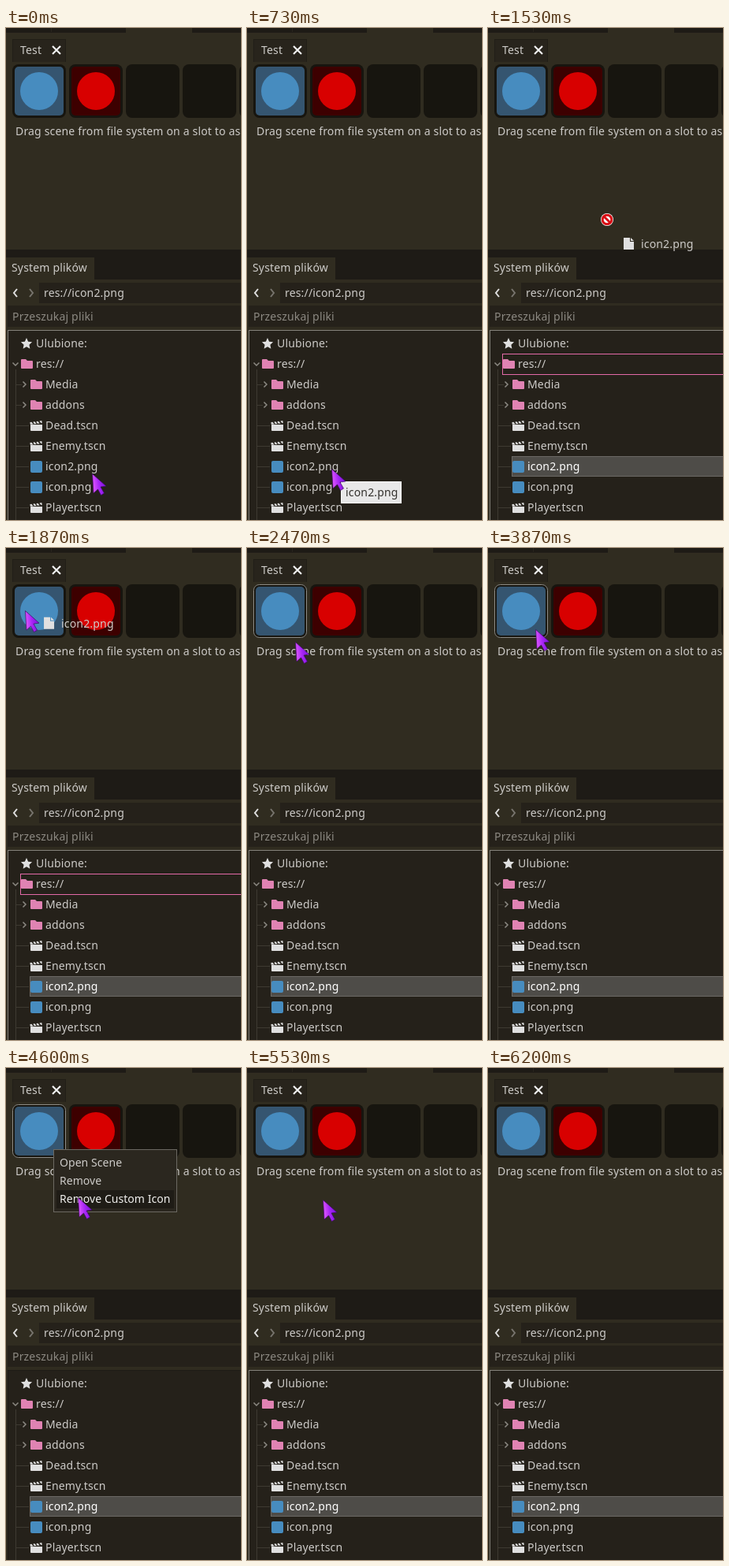
An HTML page that plays this animation: 298 by 624 pixels, repeating every 7.19 s.

```html
<!DOCTYPE html>
<html lang="pl">
<head>
<meta charset="utf-8">
<style>
html, body { margin: 0; width: 100%; height: 100%; overflow: hidden; background: #302c20; }
svg { display: block; }
text { font: 14px "Noto Sans", sans-serif; letter-spacing: .17px; fill: #cdcbc8; }
#menu text { letter-spacing: .05px; }
</style>
</head>
<body>
<svg width="298" height="624" viewBox="0 0 298 624">
  <defs>
    <linearGradient id="purple" x1="0" y1=".6" x2="1" y2=".4">
      <stop offset="0" stop-color="#e45cff"/><stop offset=".5" stop-color="#a424f4"/>
      <stop offset="1" stop-color="#7a12d8"/>
    </linearGradient>
    <path id="folder" d="M-7-5q0-1 1-1h5l2 2h6q1 0 1 1v8q0 1-1 1h-13q-1 0-1-1z" fill="#e083b3"/>
    <g id="scene" fill="#e0e0e0">
      <path d="M-7-1H8V6q0 1-1 1H-6q-1 0-1-1z"/>
      <path d="M-7-5h2l2 3h-4zM-3-5h2l2 3h-3zM1-5h2l2 3h-3zM5-5h3v3h-1z" transform="rotate(-7)"/>
    </g>
    <rect id="image" x="-7" y="-7" width="15" height="15" rx="2" fill="#478cbf"/>
  </defs>

  <!-- upper dock -->
  <rect width="298" height="624" fill="#302c20"/>
  <path d="M0 0h152v6H0zM236 0h62v6h-62z" fill="#1e1b16"/>
  <path d="M57.5 0v5" stroke="#2a261e"/>
  <rect x="8" y="14" width="68" height="29" fill="#28241c"/>
  <path d="M8 14.5h68M8.5 14v29M75.5 14v29" stroke="#211e17" fill="none"/>
  <text x="18" y="33">Test</text>
  <path d="M59 23l10 10m0-10l-10 10" stroke="#f0f0f0" stroke-width="2.2"/>
  <g id="slots"></g>
  <rect id="focus" x="8.5" y="46.5" width="67" height="67" rx="7" fill="none" stroke="#8e8b84"/>
  <text x="12" y="136">Drag scene from file system on a slot to assign</text>

  <!-- file system dock -->
  <rect y="281" width="298" height="38" fill="#1e1b16"/>
  <rect y="291" width="112" height="29" fill="#302c20"/>
  <text x="7" y="309">System plików</text>
  <path d="M14 331l-4 5 4 5" fill="none" stroke="#e0e0e0" stroke-width="2"/>
  <path d="M30 331l4 5-4 5" fill="none" stroke="#77746d" stroke-width="2"/>
  <rect x="42" y="323" width="260" height="26" fill="#25211a"/>
  <text x="48" y="341">res://icon2.png</text>
  <rect x="2" y="352" width="300" height="27" fill="#25211a"/>
  <text x="8" y="371" style="fill:#8c8982">Przeszukaj pliki</text>
  <rect id="tree" x="2.5" y="383.5" width="300" height="250" fill="#25211a"/>
  <path d="M12.5 433v191" stroke="#3e3a32"/>
  <rect id="selected" x="30.5" y="543.5" width="280" height="25" fill="#4e4c48" stroke="#6b6965"/>
  <rect id="target" x="18.5" y="413.5" width="290" height="26" fill="none" stroke="#e46aa8"/>
  <path d="M26 393l2.1 4.7 5 .6-3.7 3.4 1 5-4.4-2.5-4.4 2.5 1-5-3.7-3.4 5-.6z" fill="#e0e0e0"/>
  <path d="M8.5 424.5l3.5 3.5 3.5-3.5" fill="none" stroke="#8c8982" stroke-width="1.5"/>
  <g id="rows"></g>

  <g id="tip">
    <rect x="119.5" y="575.5" width="76" height="27" fill="#e8e8e8" stroke="#fafafa"/>
    <text x="125" y="594" style="fill:#34322e">icon2.png</text>
  </g>

  <g id="menu">
    <rect x="60.5" y="103.5" width="156" height="79" fill="#2b271f" stroke="#6c6962"/>
    <rect id="hover" x="64" y="155" width="149" height="23" fill="#1f1c16"/>
    <text x="68" y="125">Open Scene</text>
    <text x="68" y="148">Remove</text>
    <text x="68" y="171" id="custom">Remove Custom Icon</text>
  </g>

  <g id="preview">
    <path d="M1 1h8v5h5v10H1zM10 1l4 4h-4z" fill="#e0e0e0"/>
    <text x="23" y="14">icon2.png</text>
  </g>

  <path id="arrow" d="M.5.5L18 16l-7 1 4.500 8-4 2.500L7.500 20 2 25z"
        fill="url(#purple)" stroke="#3d0a63" stroke-width=".7" stroke-linejoin="round"/>
  <g id="forbid">
    <circle r="8" fill="#fff"/>
    <path d="M-4-4L4 4" stroke="#d80d14" stroke-width="3"/>
    <circle r="5.8" fill="none" stroke="#d80d14" stroke-width="3"/>
  </g>
</svg>
<script>
const $ = id => document.getElementById(id);
const show = (id, on) => $(id).style.display = on ? '' : 'none';
const place = (id, x, y) => $(id).setAttribute('transform', `translate(${x} ${y})`);

const slotColors = [['#355570', '#478cbf'], ['#3d0000', '#d80000']];
for (let i = 0; i < 5; i++) {
  const x = 8 + 72 * i, [back, mark] = slotColors[i] || [];
  $('slots').innerHTML += `<rect x="${x}" y="46" width="68" height="68" rx="8" fill="#17150f"/>` +
    (mark ? `<rect x="${x + 3}" y="49" width="62" height="62" rx="5" fill="${back}"/>
      <circle cx="${x + 34}" cy="80" r="24" fill="${mark}"/>` : '');
}

const rows = [
  ['Ulubione:'], ['res://', 'folder'], ['Media', 'folder'], ['addons', 'folder'],
  ['Dead.tscn', 'scene'], ['Enemy.tscn', 'scene'],
  ['icon2.png', 'image'], ['icon.png', 'image'], ['Player.tscn', 'scene']
];
rows.forEach(([name, icon], i) => {
  const y = 400 + 26 * i, nested = i > 1, x = nested ? 38 : 26;
  const closed = nested && icon === 'folder';
  $('rows').innerHTML +=
    (nested ? `<path d="M13 ${y + .5}h${closed ? 7 : 16}" stroke="#3e3a32"/>` : '') +
    (closed ? `<path d="M21.5 ${y - 3.5}l3.5 3.5-3.5 3.5" fill="none" stroke="#8c8982" stroke-width="1.5"/>` : '') +
    (icon ? `<use href="#${icon}" x="${x}" y="${y}"/>` : '') +
    `<text x="${x + 12}" y="${y + 5}">${name}</text>`;
});
const chosen = $('rows').querySelectorAll('text')[6];

// Pointer moves in ticks of 1/15 s; "via" bends the way
const origin = [109, 565];
const moves = [
  { from: 7, until: 11, to: [107, 559] },
  { from: 18, until: 29, to: [14, 78], via: [232, 98] },
  { from: 33, until: 37, to: [61, 119] },
  { from: 46, until: 54, to: [60, 103], via: [97, 111] },
  { from: 63, until: 65, to: [57, 179] },
  { from: 66, until: 69, to: [91, 164] },
  { from: 81, until: 83, to: [96, 167] },
  { from: 84, until: 93, to: [84, 640] }
];
function pointer(tick) {
  let pos = origin;
  for (const { from, until, to, via } of moves) {
    if (tick <= from) break;
    const u = Math.min(1, (tick - from) / (until - from)), s = u * u * (3 - 2 * u);
    pos = pos.map((p, i) => {
      const c = via ? via[i] : (p + to[i]) / 2;
      return (1 - s) ** 2 * p + 2 * s * (1 - s) * c + s * s * to[i];
    });
  }
  return pos;
}

function draw(ms) {
  const tick = Math.floor((ms + 4) * 15 / 1000);
  const within = (a, b) => tick >= a && tick < b;
  const [x, y] = pointer(tick);
  const blocked = within(21, 28);
  show('arrow', !blocked);
  show('forbid', blocked);
  place(blocked ? 'forbid' : 'arrow', x, y);

  // The dragged label trails slightly behind the pointer
  const [px, py] = pointer(tick - 0.2);
  place('preview', px + 19, py + 7);
  show('preview', within(20, 34));

  show('tip', within(8, 19));
  show('selected', tick >= 19);
  chosen.style.fill = tick >= 19 ? '#fff' : '';
  show('target', within(21, 34));
  show('focus', within(34, 79));
  show('menu', within(60, 79));
  show('hover', tick >= 67);
  $('custom').style.fill = tick >= 67 ? '#f0efed' : '';
  $('tree').setAttribute('stroke', within(60, 79) ? '#1e1b16' : '#85827b');
}

const start = performance.now();
function loop() {
  draw((performance.now() - start) % 7190);
  requestAnimationFrame(loop);
}
loop();
</script>
</body>
</html>
```
